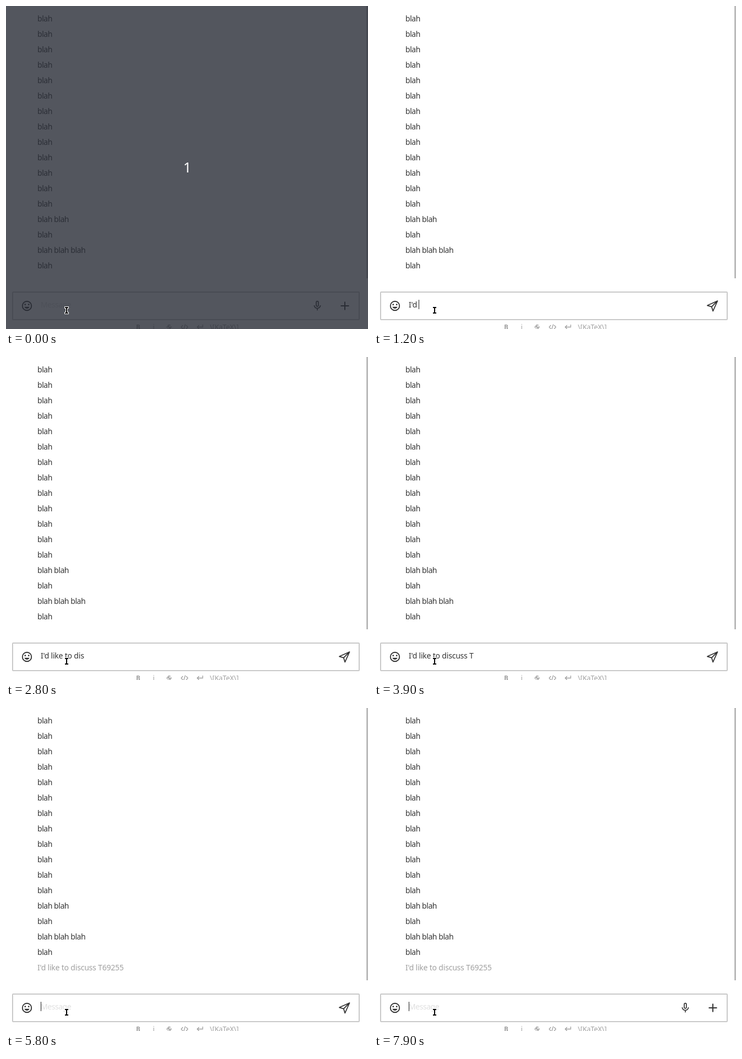
These frames come from a looping animation (657x586 px, 8 s). An HTML page:

```html
<!DOCTYPE html>
<html lang="en">
<head>
<meta charset="utf-8">
<title>Chat message being typed</title>
<style>
  html, body { margin: 0; width: 100%; height: 100%; overflow: hidden; background: #fff; }
  svg { display: block; width: 657px; height: 586px; }
  text { font: 14px "Noto Sans", sans-serif; fill: #333; white-space: pre; }
  .tight { letter-spacing: -.45px; }
  .line { letter-spacing: -.2px; }
  .muted { fill: #a0a0a0; }
  #tools text { font-size: 12.4px; fill: #a0a0a0; }
  .icon { fill: none; stroke: #333; stroke-width: 1.8; }
  .solid { fill: #333; stroke: none; }
</style>
</head>
<body>
<svg viewBox="0 0 657 586">
  <g id="rows"></g>
  <rect x="654" width="3" height="494" fill="#bbb"/>
  <rect x="12" y="519" width="629" height="50" rx="1" fill="none" stroke="#c9c9c9" stroke-width="2"/>

  <g class="icon" transform="translate(27 533) scale(.917)">
    <circle cx="12" cy="12" r="9" stroke-width="2"/>
    <g class="solid">
      <circle cx="8.5" cy="9.5" r="1.5"/>
      <circle cx="15.5" cy="9.5" r="1.5"/>
      <path d="M6.9 14h10.2a5.5 5.5 0 0 1-10.2 0Z"/>
    </g>
  </g>
  <g id="idle" class="icon">
    <g transform="translate(554 533) scale(.917)">
      <rect x="9.9" y="2.9" width="4.2" height="10.2" rx="2.1"/>
      <path d="M5.85 11a6.15 5.95 0 0 0 12.3 0M12 17v4"/>
    </g>
    <path d="M607.5 544h15M615 536.5v15" stroke-width="2"/>
  </g>
  <path id="send" class="icon" stroke-linejoin="round" d="M605 543.3L623.5 535L615.2 553.5L612.8 545.7ZL612.8 545.7L623.5 535"/>

  <text id="hint" class="tight" x="63" y="547" style="fill:#e0e0e0">Message</text>
  <text id="typed" class="line" x="63" y="547"></text>
  <rect id="caret" y="533" width="1" height="17" fill="#222"/>

  <g id="tools">
    <text x="236" y="586.5" style="font-size:11.5px;font-weight:700">B</text>
    <text x="266.5" y="586.5">i</text>
    <text x="292.5" y="586.5" style="font-weight:600">S</text>
    <g fill="none" stroke="#a0a0a0" stroke-width="1.3">
      <path d="M291 582.5h10M321 579l-3 3.5l3 3.5M325.5 577.5l-3 9M327 579l3 3.5l-3 3.5"/>
      <path d="M357 578v4.5h-10M350.5 579l-3.5 3.5l3.5 3.5"/>
    </g>
    <text x="370" y="587">\[KaTeX\]</text>
  </g>

  <g id="countdown">
    <rect width="657" height="586" fill="rgb(40,44,54)" fill-opacity=".8"/>
    <text x="329" y="302" text-anchor="middle" style="font-size:25.5px;font-weight:500;fill:#fff">1</text>
  </g>

  <g fill="none" stroke-linecap="square">
    <path d="M108 547h4M108 557h4M110 547v10" stroke="#fff" stroke-width="4"/>
    <path d="M108 547h4M108 557h4M110 547v10" stroke="#000" stroke-width="2"/>
  </g>
</svg>
<script>
const LOOP = 8000, START = 300, SENT = 5800, IDLE_AGAIN = 5900;

// Bursts of evenly spaced keystrokes: text, first key (ms), last key (ms)
const bursts = [
  ["I'd ", 600, 1200], ["like ", 1400, 1900], ["to di", 2200, 2500], ["scuss ", 2800, 3200],
  ["T", 3600, 3600], ["69", 4400, 4900], ["255", 5100, 5400]
];
const caretGaps = [[0, START], [2800, 2900], [3900, 4400], [5100, 5400], [6400, 7900]];

const message = bursts.map(burst => burst[0]).join("");
const history = [...Array(13).fill("blah"), "blah blah", "blah", "blah blah blah", "blah", message];

const $ = id => document.getElementById(id);
const show = (id, on) => $(id).setAttribute("visibility", on ? "visible" : "hidden");

const rows = Array.from({ length: 17 }, (_, i) => {
  const row = document.createElementNS("http://www.w3.org/2000/svg", "text");
  row.setAttribute("x", 57);
  row.setAttribute("y", 28 + 28 * i);
  return $("rows").appendChild(row);
});

function typedAt(t) {
  return bursts.map(([text, first, last]) => {
    const gap = (last - first) / (text.length - 1) || 1;
    return text.slice(0, Math.max(0, Math.floor((t - first) / gap) + 1));
  }).join("");
}

function render(t) {
  const sent = t >= SENT;
  rows.forEach((row, i) => {
    const content = history[i + sent];
    row.textContent = content;
    row.setAttribute("class", content === message ? "line muted" : "tight");
  });

  const draft = sent ? "" : typedAt(t);
  $("typed").textContent = draft;
  const width = draft ? $("typed").getComputedTextLength() : 0;
  $("caret").setAttribute("x", Math.floor(63 + width));
  show("caret", !caretGaps.some(([from, to]) => t >= from && t < to));
  show("hint", !draft);

  const sending = t >= bursts[0][1] && t < IDLE_AGAIN;
  show("send", sending);
  show("idle", !sending);
  show("countdown", t < START);
}

const start = performance.now();
function tick() {
  render((performance.now() - start) % LOOP);
  requestAnimationFrame(tick);
}
tick();
</script>
</body>
</html>
```
